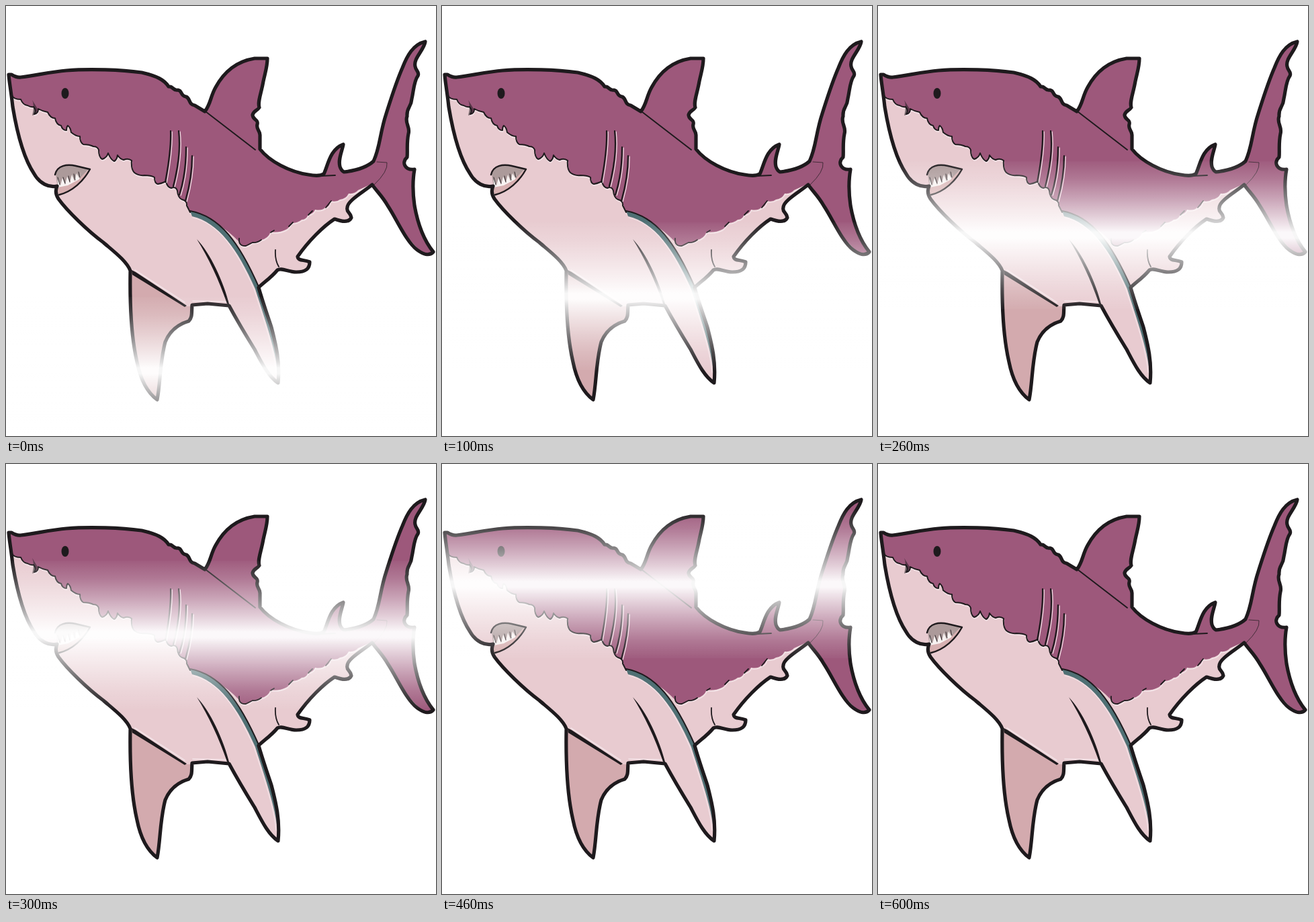
An HTML page that plays this animation: 640x640 px, repeating every 0.7 s.

```html
<!DOCTYPE html>
<html lang="en">
<head>
<meta charset="utf-8">
<title>Shark with a passing shine</title>
<style>
  html, body { margin: 0; width: 100%; height: 100%; overflow: hidden; background: #fff; }
  .stage { position: relative; width: 640px; height: 640px; overflow: hidden; }
  svg { display: block; }
  .ink { fill: none; stroke: #1e1a1d; stroke-linecap: round; stroke-linejoin: round; }
  .glint { fill: none; stroke: #f3e4e8; stroke-linecap: round; stroke-linejoin: round; }
  .solid { fill: #1e1a1d; }

  /* The background is white, so the shine only shows on the shark. */
  .shine {
    position: absolute; left: 0; top: -110px; width: 640px; height: 220px;
    background: linear-gradient(
      rgba(255,255,255,.03) 0%, rgba(255,255,255,.2) 12%, rgba(255,255,255,.45) 25%,
      rgba(255,255,255,.7) 37%, rgba(255,255,255,.86) 44%, rgba(255,255,255,.96) 48%,
      rgba(255,255,255,.96) 52%, rgba(255,255,255,.86) 56%, rgba(255,255,255,.7) 63%,
      rgba(255,255,255,.45) 75%, rgba(255,255,255,.2) 88%, rgba(255,255,255,.03) 100%);
    animation: sweep 700ms step-end infinite;
  }
  @keyframes sweep {
    0%       { transform: translateY(543px); }
    14.2857% { transform: translateY(432px); }
    28.5714% { transform: translateY(341px); }
    42.8571% { transform: translateY(254px); }
    57.1429% { transform: translateY(179px); }
    71.4286% { transform: translateY(86px); }
    85.7143%, 100% { transform: translateY(-240px); }
  }
</style>
</head>
<body>
<div class="stage">
  <svg width="640" height="640" viewBox="0 0 640 640">
    <defs>
      <path id="body" d="M4 102 L8 102 C13 105 17 107 22 106 C45 103 68 98 90 96
        C125 93 172 95 202 99 C224 104 236 110 242 120 C249 119 249 127 256 125
        C263 126 259 134 268 135 C275 138 271 146 281 148 L296 157
        C305 145 304 135 312 121 C325 97 345 82 370 78 L389 78
        C389 90 386 98 383 112 C380 130 374 143 377 151 C374 156 369 155 367 162
        C367 170 376 168 374 176 C372 184 378 185 378 192 L378 213
        C392 231 422 247 450 251 C460 253 468 253 473 250
        C479 238 482 213 502 206 C500 217 494 228 497 239 Q499 245 503 247
        C520 245 536 241 547 231 C557 210 556 190 566 160 C574 135 580 115 590 92
        C597 74 606 57 624 53 C622 66 606 78 609 90 C610 97 616 98 613 104
        C607 112 607 125 604 138 C603 152 596 150 597 164 C593 174 602 180 599 190
        C596 205 598 215 597 225 C588 233 594 245 608 243
        C605 260 605 276 608 297 C613 325 623 350 636 366
        C630 373 620 369 612 363 C595 350 582 318 568 297 C560 283 552 276 545 266
        C530 278 508 290 508 300 C506 307 513 307 514 315 C510 323 500 321 489 317
        C472 328 450 350 434 373 C435 380 443 377 452 381 C452 391 446 396 432 396
        C420 396 410 389 404 393 C394 405 384 411 376 419
        C382 440 389 460 395 478 C402 505 408 530 405 561
        C390 551 380 530 370 511 C357 490 345 470 332 446 L300 443 L277 445
        C276 455 278 463 272 469 C255 474 243 485 237 500
        C229 530 230 560 225 586 C210 575 200 555 195 530
        C188 500 184 450 185 394 C180 380 160 365 145 352
        C122 335 91 305 78 287 C74 281 73 275 76 268 C64 271 50 264 42 250
        C25 225 15 180 10 150 C8 130 5 115 4 102 Z"/>
      <path id="side"/>
      <path id="belly"/>
      <clipPath id="inside"><use href="#body"/></clipPath>
    </defs>

    <use href="#body" fill="#e8cbd0"/>
    <g clip-path="url(#inside)">
      <path id="back" fill="#9d587b"/>
      <path fill="#d3aaae" d="M180 392 L191 397 L268 447 L282 447 L275 480 L235 600 L180 580 Z"/>
      <path fill="#4f7074" d="M274 305 C318 313 347 351 377 420 C391 458 406 492 408 540
        L404 545 C401 510 385 465 371 421 C345 362 316 322 277 313 Z"/>
      <path class="glint" stroke="#c9cfd6" stroke-width="1.2" d="M278 315 C316 323 343 362 369 421 C383 465 399 510 402 545"/>
      <path class="glint" stroke-width="1.5" d="M278 439 L330 440 M192 393 L266 441"/>
    </g>

    <use href="#side" class="glint" stroke-width="1.4" transform="translate(.5 2.2)"/>
    <use href="#side" class="ink" stroke-width="2"/>
    <path class="solid" d="M39 140 Q43 148 39 163 Q46 161 47 153 Z" fill-opacity=".55"/>
    <use href="#belly" class="glint" stroke-width="1.4" transform="translate(.5 1.5)"/>
    <path class="ink" stroke-width="1.8" d="M347 346 Q346 358 357 357 L367 352 Q373 353 380 348
      M394 337 L399 334 M421 328 L427 322 M450 311 L456 305 M476 300 L484 290"/>

    <path class="ink" stroke-width="2" d="M274 305 C318 313 347 351 377 420"/>
    <path class="solid" d="M284 347 C304 368 324 410 333 447 L329 443 C317 408 301 374 284 347 Z"/>
    <path class="solid" d="M187 393 L193 396 L269 446 L266 448 L188 400 Z"/>
    <path class="ink" stroke-width="2" d="M297 157 L371 214"/>
    <path class="ink" stroke-width="1.8" d="M468 253 L490 252 M401 363 Q400 378 406 388"/>
    <path class="ink" stroke-width="1" d="M552 232 L567 233 Q569 246 548 266" opacity=".7"/>

    <!-- gills -->
    <g id="gills">
      <path id="slits" class="glint" stroke="#c394aa" stroke-width="1.2" transform="translate(2.2 1)"
        d="M245 186 Q246 215 237 262 M257 186 Q261 222 249 268
           M268 210 Q268 250 258 281 M277 223 Q277 255 267 290"/>
      <use href="#slits" visibility="hidden"/>
      <path class="ink" stroke-width="2.2"
        d="M245 186 Q246 215 237 262 M257 186 Q261 222 249 268
           M268 210 Q268 250 258 281 M277 223 Q277 255 267 290"/>
    </g>

    <!-- mouth -->
    <path fill="#d7b0b1" d="M75 268 L100 262 L125 243 C115 261 99 276 78 282 Z"/>
    <path fill="#ac9a9a" d="M74 250 C77 237 91 235 104 238 L123 243 L108 258 L77 270 Z"/>
    <path fill="#f8f3f2" d="M77 257 L81 267 L84 256 L88 266 L91 254 L95 263 L98 251
      L102 261 L105 249 L109 256 L112 247 L109 258 L92 267 L77 270 Z"/>
    <path class="ink" stroke-width=".9" d="M77 255 L80 266 M85 255 L88 264 M93 253 L95 262 M101 250 L103 259 M108 247 L110 255"/>
    <path class="ink" stroke-width="2.4" d="M73 251 C76 237 91 235 104 238 L125 243 C115 261 99 276 79 281"/>

    <ellipse class="solid" cx="88" cy="130" rx="5.5" ry="8"/>
    <use href="#body" class="ink" stroke-width="5.2"/>
  </svg>
  <div class="shine"></div>
</div>
<script>
  // The two edges of the dark back, each used for its fill and its lines.
  const side = `9 133 Q11 139 22 139 Q25 147 32 148 Q37 151 41 150 Q46 156 42 161
    Q48 160 48 153 Q55 157 62 158 Q66 167 73 167 Q75 177 82 178 Q84 185 90 185
    Q90 180 92 178 Q96 181 97 188 Q104 194 110 194 Q110 203 115 206 Q124 206 130 209
    Q136 209 138 214 Q138 225 143 228 Q150 226 152 219 Q156 229 161 231
    Q165 229 166 222 Q170 228 175 229 Q182 226 187 230 Q186 243 191 248
    Q198 253 206 252 Q216 252 221 255 Q221 264 226 265 Q232 264 238 261
    Q240 270 246 271 Q253 268 255 275 Q256 286 262 288 Q270 290 269 297 L274 307`;
  const belly = `347 351 Q349 359 358 357 Q364 355 366 352 Q374 353 380 348
    Q390 346 394 336 Q406 338 416 333 Q421 331 425 323 Q434 323 440 318
    Q447 318 450 310 Q457 310 460 303 Q470 305 475 300 Q482 299 483 290
    Q492 292 497 288 Q506 287 510 279 Q519 280 524 274 L546 264`;
  const draw = (id, d) => document.getElementById(id).setAttribute("d", d);
  draw("side", `M${side}`);
  draw("belly", `M${belly}`);
  draw("back", `M0 133 L${side} Q314 317 ${belly} L575 320 L640 390 V0 H0 Z`);
</script>
</body>
</html>
```
